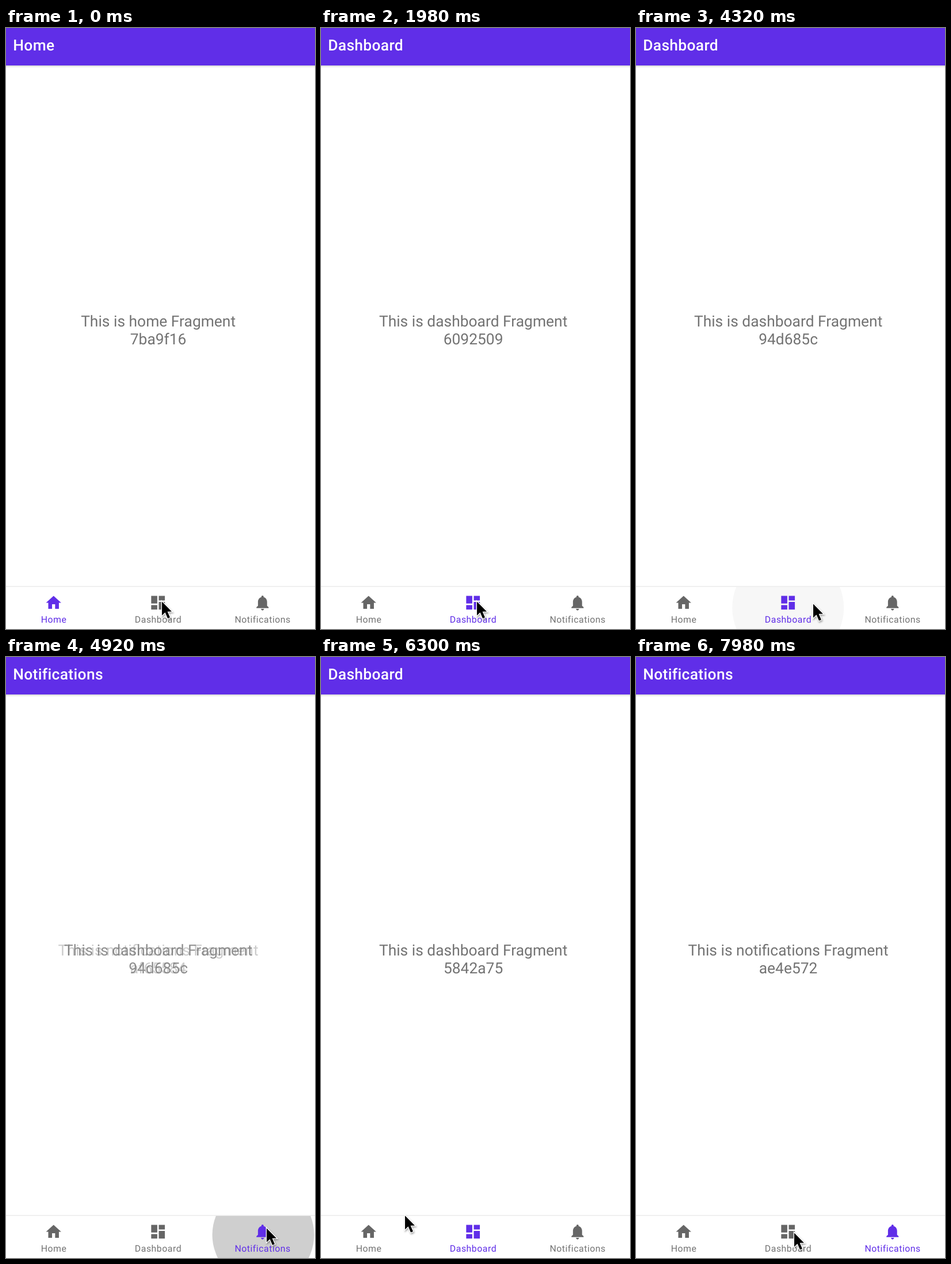
An HTML page that plays this animation: 537x1043 px, repeating every 8 s.

```html
<!DOCTYPE html>
<html lang="en">
<head>
<meta charset="utf-8">
<title>Bottom navigation</title>
<style>
  html, body { margin: 0; width: 100%; height: 100%; overflow: hidden; background: #fff; }
  svg { display: block; width: 537px; height: 1043px; font-family: Roboto, sans-serif; text-rendering: geometricPrecision; }
  #title { font-size: 26.4px; font-weight: 500; letter-spacing: .0125em; fill: #fff; }
  .page { font-size: 26.4px; fill: #737373; text-anchor: middle; }
  .tab { fill: #737373; }
  .tab path { fill: #666; }
  .tab text { font-size: 15.84px; letter-spacing: .0333em; text-anchor: middle; }
  .tab.on, .tab.on path { fill: #602ee8; }
  #cursor { filter: drop-shadow(1px 2px 1.5px rgba(0, 0, 0, .35)); }
</style>
</head>
<body>
<svg viewBox="0 0 537 1043">
  <defs>
    <linearGradient id="shade" x2="0" y2="1">
      <stop stop-color="#000" stop-opacity=".16"/>
      <stop offset="1" stop-color="#000" stop-opacity="0"/>
    </linearGradient>
    <clipPath id="nav"><rect y="970" width="537" height="73"/></clipPath>
  </defs>
  <rect width="537" height="1043" fill="#fff"/>
  <rect y="65" width="537" height="4" fill="url(#shade)"/>
  <rect width="537" height="65" fill="#602ee8"/>
  <text id="title" x="12.2" y="38.7"></text>
  <g id="leaving" class="page"><text x="264.6" y="518.3"></text><text x="264.6" y="549.3"></text></g>
  <g id="entering" class="page"><text x="264.6" y="518.3"></text><text x="264.6" y="549.3"></text></g>
  <rect y="968.5" width="537" height="1.5" fill="#ececec"/>
  <g clip-path="url(#nav)"><circle id="ripple" fill="#000"/></g>
  <g id="tabs"></g>
  <path id="cursor" d="M1 1.5V25.5L6.6 20.2L11 30.6L15 28.9L10.6 18.8H18Z"
        fill="#000" stroke="#fff" stroke-width="2.6" paint-order="stroke"/>
</svg>
<script>
const LOOP = 8000, STEP = 60;
const $ = id => document.getElementById(id);
const clamp = v => Math.max(0, Math.min(1, v));
const mix = (a, b, p) => a + (b - a) * p;

const tabs = [
  { name: 'Home', x: 82.7, icon: 'M10 20v-6h4v6h5v-8h3L12 3 2 12h3v8z' },
  { name: 'Dashboard', x: 264.2, icon: 'M3 13h8V3H3zM3 21h8v-6H3zM13 21h8V11h-8zM13 3v6h8V3z' },
  { name: 'Notifications', x: 445.8, icon: 'M12 22c1.1 0 2-.9 2-2h-4c0 1.1.9 2 2 2zm6-6v-5c0-3.07-1.64-5.64-4.5-6.32V4c0-.83-.67-1.5-1.5-1.5s-1.5.67-1.5 1.5v.68C7.63 5.36 6 7.92 6 11v5l-2 2v1h16v-1z' }
];

// press time, tab index, fragment id
const visits = [
  [-1000, 0, '7ba9f16'],
  [1680, 1, '6092509'],
  [3360, 0, '7ba9f16'],
  [4080, 1, '94d685c'],
  [4860, 2, 'af65584'],
  [5580, 1, '5842a75'],
  [7260, 2, 'ae4e572']
];

// time, x, y of the pointer tip
const track = [
  [0, 270, 994], [2280, 270, 994], [3120, 90, 987], [3600, 90, 987],
  [4020, 307, 998], [4440, 307, 998], [4800, 452, 990], [5040, 452, 990],
  [5400, 297, 977], [5760, 297, 977], [6240, 145, 968], [6480, 145, 968],
  [7080, 460, 992], [7500, 460, 992], [7980, 274, 998]
];

$('tabs').innerHTML = tabs.map(({ name, x, icon }) => `<g class="tab">
  <path transform="translate(${x - 15.84} 981.6) scale(1.32)" d="${icon}"/>
  <text x="${x + .3}" y="1031.8">${name}</text></g>`).join('');
const tabNodes = [...$('tabs').children];

function pointer(t) {
  let i = 0;
  while (i < track.length - 2 && t >= track[i + 1][0]) i++;
  const [t0, x0, y0] = track[i], [t1, x1, y1] = track[i + 1];
  const p = clamp((t - t0) / (t1 - t0)), e = p * p * (3 - 2 * p);
  return [mix(x0, x1, e), mix(y0, y1, e)];
}

function showPage(id, [, tab, hash], alpha) {
  const [line, code] = $(id).children;
  line.textContent = `This is ${tabs[tab].name.toLowerCase()} Fragment`;
  code.textContent = hash;
  $(id).setAttribute('opacity', alpha);
}

function drawRipple(dt, x, [px, py]) {
  const p = 1 - (1 - clamp((dt + 40) / 180)) ** 2;
  const ripple = $('ripple');
  ripple.setAttribute('cx', mix(px, x, p));
  ripple.setAttribute('cy', mix(py, 1006, p));
  ripple.setAttribute('r', mix(54, 97, p));
  ripple.setAttribute('opacity', .19 * clamp(1 - (dt - 120) / 145));
}

function draw(time) {
  const t = Math.floor(time / STEP) * STEP;
  const i = visits.findLastIndex(v => t >= v[0]);
  const now = visits[i], last = visits[Math.max(0, i - 1)];
  const dt = t - now[0];
  const fade = clamp((dt - 30) / 150);
  const active = dt < STEP ? last[1] : now[1];

  $('title').textContent = tabs[active].name;
  tabNodes.forEach((node, k) => node.classList.toggle('on', k === active));
  showPage('leaving', last, 1 - fade);
  showPage('entering', now, 1 - (1 - fade) ** 2);
  drawRipple(dt, tabs[now[1]].x, pointer(now[0]));
  $('cursor').setAttribute('transform', `translate(${pointer(t).join(' ')})`);
}

const start = performance.now();
function tick() {
  draw((performance.now() - start) % LOOP);
  requestAnimationFrame(tick);
}
tick();
</script>
</body>
</html>
```
